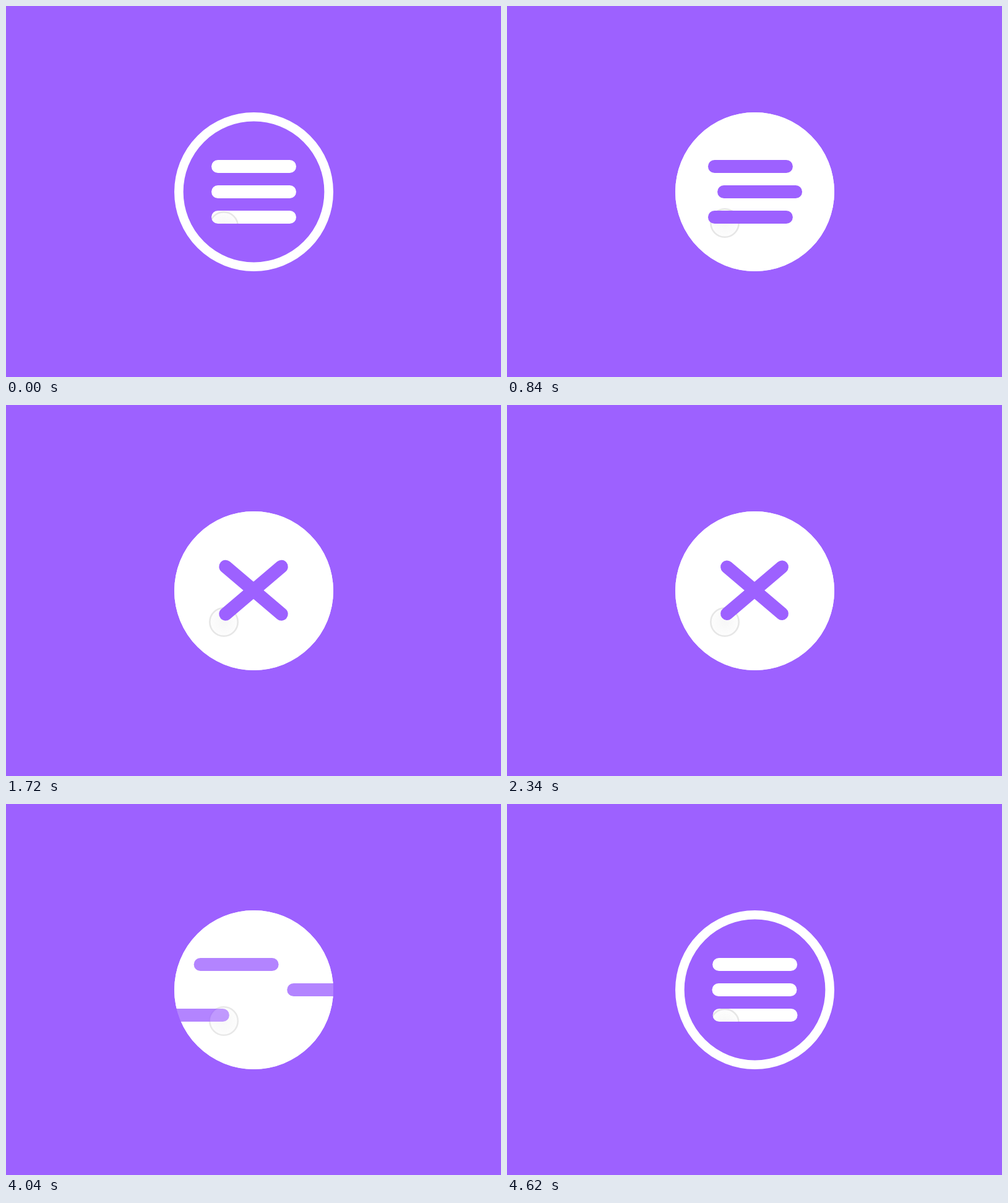
These frames come from a looping animation (800 px wide and 600 px high, 4.64 s). An HTML page with a canvas:

```html
<!DOCTYPE html>
<html lang="en">
<head>
<meta charset="utf-8">
<title>Menu button</title>
<style>
  html, body { margin: 0; width: 100%; height: 100%; overflow: hidden; background: #9d61ff; }
  canvas { display: block; }
</style>
</head>
<body>
<canvas id="stage" width="800" height="600"></canvas>
<script>
const ctx = document.getElementById('stage').getContext('2d');
const LOOP = 4640, PURPLE = '#9d61ff', WHITE = '#fff';
const CENTER = 400.5, MIDDLE = 300.5, HALF = 58;
const SIDES = [-1, 1.13, -1];

const progress = (t, from, to) => Math.min(1, Math.max(0, (t - from) / (to - from)));
const spring = (ms, decay) => ms <= 0 ? 1 : Math.exp(-decay * ms / 1000) * Math.cos(6 * ms / 1000);

function circle(x, y, r) {
  ctx.beginPath();
  ctx.arc(x, y, r, 0, 2 * Math.PI);
}

function line(x1, y1, x2, y2, width, color) {
  ctx.beginPath();
  ctx.moveTo(x1, y1);
  ctx.lineTo(x2, y2);
  ctx.lineCap = 'round';
  ctx.lineWidth = width;
  ctx.strokeStyle = color;
  ctx.stroke();
}

function bars(color, shift) {
  SIDES.forEach((side, i) => {
    const x = CENTER + side * shift(i), y = MIDDLE + (i - 1) * 41;
    line(x - HALF, y, x + HALF, y, 21, color);
  });
}

function cross(scale) {
  if (scale <= 0) return;
  const dx = 44.4 * scale, dy = 37.8 * scale, x = 400, y = 299.7;
  line(x - dx, y - dy, x + dx, y + dy, 21 * scale, PURPLE);
  line(x - dx, y + dy, x + dx, y - dy, 21 * scale, PURPLE);
}

function cursorY(t) {
  if (t < 220) return 356 + 21 * progress(t, 60, 220);
  return 351 + 5 * progress(t, 4580, LOOP);
}

function cursor(t, glow) {
  if (t >= 220 && t < 440) return;
  const x = 352, y = cursorY(t);
  circle(x, y, 22.7);
  if (glow) {
    ctx.fillStyle = `rgba(255,255,255,${glow})`;
    ctx.fill();
    return;
  }
  const shade = ctx.createRadialGradient(x, y, 0, x, y, 23);
  shade.addColorStop(0, '#f7f7f7');
  shade.addColorStop(1, '#fdfdfd');
  ctx.fillStyle = shade;
  ctx.fill();
  ctx.lineWidth = 2.6;
  ctx.strokeStyle = '#e6e6e6';
  ctx.stroke();
}

function draw(t) {
  const fill = progress(t, 440, 740) - progress(t, 4400, 4600);
  const returning = t >= 3900;
  const barAlpha = returning ? progress(t, 3900, 4080) : 1 - progress(t, 860, 1143);
  const shift = i => returning
    ? 150 * spring(t - 3900 - (i ? 106 : 0), 9)
    : 144 * (Math.max(0, t - 760) / 360) ** 2;

  ctx.globalCompositeOperation = 'source-over';
  ctx.globalAlpha = 1;
  ctx.clearRect(0, 0, 800, 600);

  circle(CENTER, MIDDLE, 121.2);
  ctx.lineWidth = 14.6;
  ctx.strokeStyle = WHITE;
  ctx.stroke();
  if (fill > 0) {
    ctx.globalAlpha = fill;
    circle(CENTER, MIDDLE, 128.5);
    ctx.fillStyle = WHITE;
    ctx.fill();
    ctx.globalAlpha = 1;
  }
  if (fill < 1) bars(WHITE, shift);

  // Everything else shows only on the white shapes.
  ctx.globalCompositeOperation = 'source-atop';
  cursor(t);
  if (fill > 0 && barAlpha > 0) {
    ctx.globalAlpha = fill * barAlpha;
    bars(PURPLE, shift);
    ctx.globalAlpha = 1;
    if (fill === 1 && barAlpha < 1) cursor(t, 0.18);
  }
  if (t >= 1200 && t < 3760) {
    cross((1 - spring(t - 1200, 8)) * (1 - progress(t, 3500, 3760) ** 2));
  }
}

const start = performance.now();
function frame() {
  const t = (performance.now() - start) % LOOP;
  draw(Math.floor(t / 20) * 20);
  requestAnimationFrame(frame);
}
frame();
</script>
</body>
</html>
```
